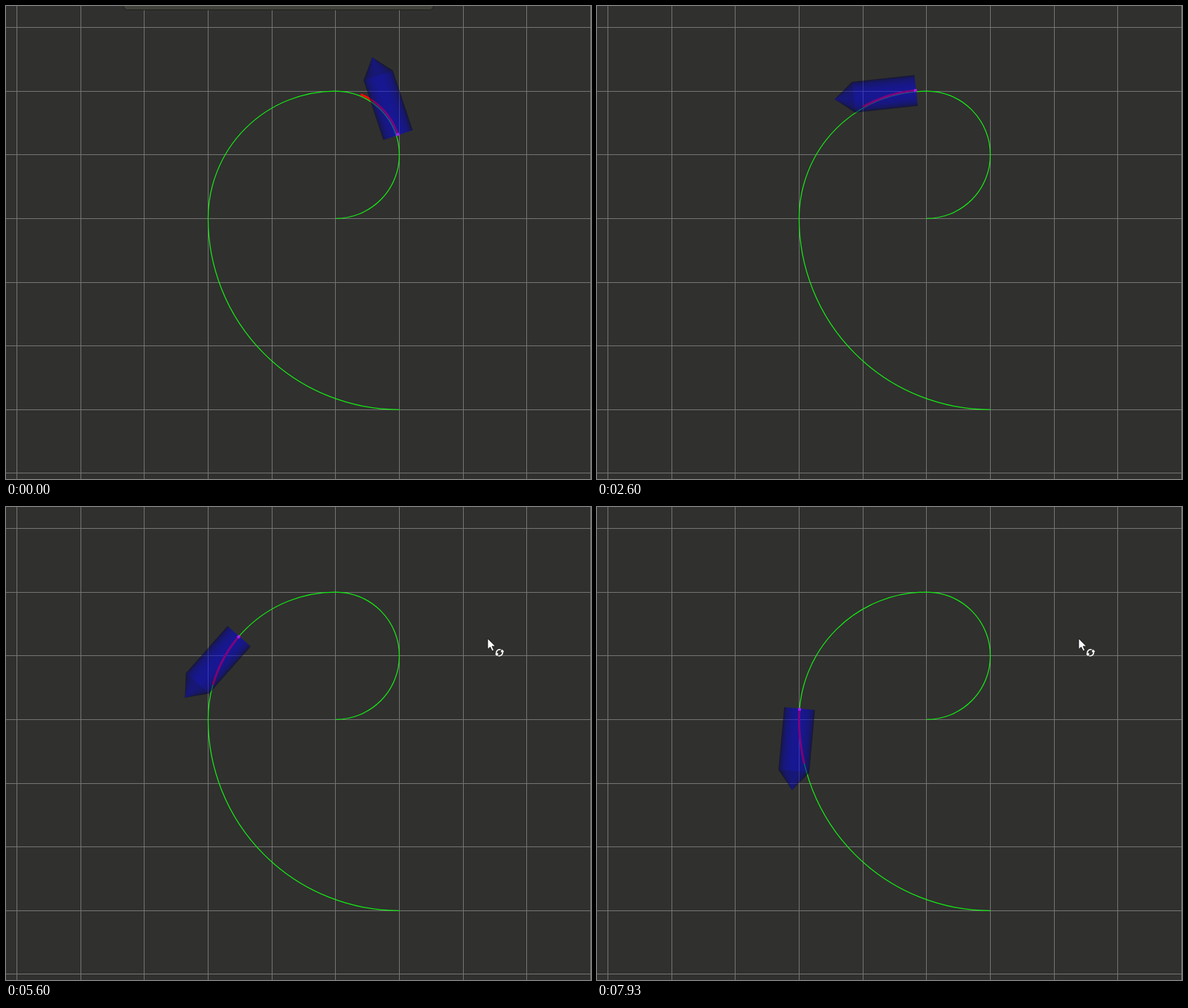
Recreate the animation shown at these times as an HTML page. Size 832x673 px, loop 8 s.

```html
<!DOCTYPE html>
<html lang="en">
<head>
<meta charset="utf-8">
<title>Path following</title>
<style>
  html, body { margin: 0; width: 100%; height: 100%; overflow: hidden; background: #30302e; }
  svg { display: block; width: 100%; height: 100%; }
</style>
</head>
<body>
<svg viewBox="0 0 832 673">
  <defs>
    <linearGradient id="shade" x1="0" y1="0" x2="0" y2="1"/>
  </defs>
  <rect width="832" height="673" fill="#30302e"/>
  <path id="grid" fill="none" stroke="#777775" shape-rendering="crispEdges"/>
  <path id="route" fill="none" stroke="#14ee14" stroke-width="1.25"/>
  <path id="ahead" fill="none" stroke="#ff0808" stroke-width="3"/>
  <g id="body">
    <g id="hull" opacity=".5">
      <rect y="-22" width="89.7" height="44" fill="url(#shade)"/>
    </g>
    <rect x="-1" y="-2" width="4" height="4" fill="#a81ee6"/>
  </g>
  <rect id="panel" x="167.5" y="-20" width="440" height="25.5" rx="5" fill="#41423a" stroke="#1f1f1c"/>
  <g id="cursor">
    <path d="M0 0V15.5L3.6 12.2L6.4 18L9 16.8L6.3 11.2H11Z" fill="#fff" stroke="#111" stroke-width=".9"/>
    <g fill="none" stroke="#fff" stroke-width="1.6" transform="translate(0 -.6)">
      <path d="M13.2 23.6A4.6 4.6 0 0 1 18.6 16.7M20.6 18.2A4.6 4.6 0 0 1 15.2 25"/>
      <path d="M11.2 22.6L13.6 24.4L14.4 21.6M22.8 19.4L20.4 17.4L19.4 20.2"/>
    </g>
  </g>
</svg>
<script>
const $ = id => document.getElementById(id);
const RAD = Math.PI / 180;
const CELL = 90.65, LOOP = 8000, LOOKAHEAD = 79;
const gx = i => 15.5 + i * CELL;
const gy = j => 30.4 + j * CELL;

// time, distance travelled, heading error in degrees, drift off the route
const drive = [
  [0, 0, .8, 2.4], [1730, 84, 0, 2.1], [2200, 108, 0, 1.9], [2600, 129.5, 1.5, 1.5],
  [3470, 171, .8, 1.1], [4270, 208, .3, .8], [5600, 270.3, -.6, 0], [6530, 314.8, -.6, 0],
  [7930, 383.7, -.3, 0], [8000, 387, -.3, 0]
];
// time, x, y
const pointer = [
  [4070, 840, 136], [4133, 826, 141], [4200, 798, 152], [4267, 764, 165],
  [4333, 731, 175], [4400, 705, 182], [4467, 690, 186], [4533, 685, 187]
];
// centre, radius, start angle
const arcs = [
  [gx(5), gy(2), CELL, 0],
  [gx(5), gy(3), CELL * 2, 90],
  [gx(6), gy(3), CELL * 3, 180]
];

function sample(keys, t) {
  const last = keys[keys.length - 1];
  if (t >= last[0]) return last.slice(1);
  const i = Math.max(1, keys.findIndex(k => k[0] > t));
  const a = keys[i - 1], b = keys[i];
  const u = Math.max(0, (t - a[0]) / (b[0] - a[0]));
  return a.slice(1).map((v, n) => v + (b[n + 1] - v) * u);
}

function along(s, drift) {
  s += 17.5 * RAD * CELL;
  for (const [cx, cy, r, start] of arcs) {
    const len = r * Math.PI / 2;
    if (s <= len || start === 180) {
      const a = start * RAD + s / r, d = r + drift;
      return { x: cx + d * Math.cos(a), y: cy - d * Math.sin(a), heading: a / RAD + 90 };
    }
    s -= len;
  }
}

function add(parent, tag, attrs) {
  const node = document.createElementNS('http://www.w3.org/2000/svg', tag);
  for (const k in attrs) node.setAttribute(k, attrs[k]);
  parent.append(node);
}

// blue of a round surface lit from the viewer, r = -1..1 across it
const lit = (r, dark, gain) =>
  `rgb(0,0,${Math.round(dark + gain * Math.sqrt(1 - r * r))})`;

function build() {
  let d = '';
  for (let i = 0; i < 10; i++) d += `M${Math.floor(gx(i)) + .5} 0V673`;
  for (let j = 0; j < 8; j++) d += `M0 ${Math.floor(gy(j)) + .5}H832`;
  $('grid').setAttribute('d', d);

  const arc = (n, x, y) => `A${n * CELL} ${n * CELL} 0 0 0 ${x} ${y}`;
  $('route').setAttribute('d', `M${gx(5)} ${gy(3)}` + arc(1, gx(6), gy(2)) +
    arc(1, gx(5), gy(1)) + arc(2, gx(3), gy(3)) + arc(3, gx(6), gy(6)));

  for (let i = 0; i <= 20; i++) {
    add($('shade'), 'stop', { offset: i / 20, 'stop-color': lit(i / 10 - 1, 45, 200) });
  }
  // nested wedges give the nose its soft shading
  for (let i = 0; i < 12; i++) {
    const r = 1 - i / 12, w = 22 * r;
    add($('hull'), 'path', { d: `M89.6 ${-w}L116.5 0L89.6 ${w}Z`, fill: lit(r, 45, 150) });
  }
}

function draw(time) {
  // the picture advances fifteen times a second, on 10 ms marks
  const part = time % 200;
  const step = 3 * Math.floor(time / 200) + (part >= 70) + (part >= 130);
  const t = step * 200 / 3;

  const [s, error, drift] = sample(drive, t);
  const p = along(s, drift);
  $('body').setAttribute('transform', `translate(${p.x} ${p.y}) rotate(${-p.heading - error})`);

  const line = [];
  for (let i = 0; i <= 24; i++) {
    const q = along(s + LOOKAHEAD * i / 24, drift);
    line.push(`${q.x.toFixed(2)} ${q.y.toFixed(2)}`);
  }
  $('ahead').setAttribute('d', 'M' + line.join('L'));

  const [x, y] = sample(pointer, t);
  $('cursor').setAttribute('transform', `translate(${x} ${y})`);
  $('cursor').style.display = t < 4100 ? 'none' : '';
  $('panel').style.display = step ? 'none' : '';
}

build();
draw(0);
const begin = performance.now();
function tick() {
  draw((performance.now() - begin) % LOOP);
  requestAnimationFrame(tick);
}
requestAnimationFrame(tick);
</script>
</body>
</html>
```
